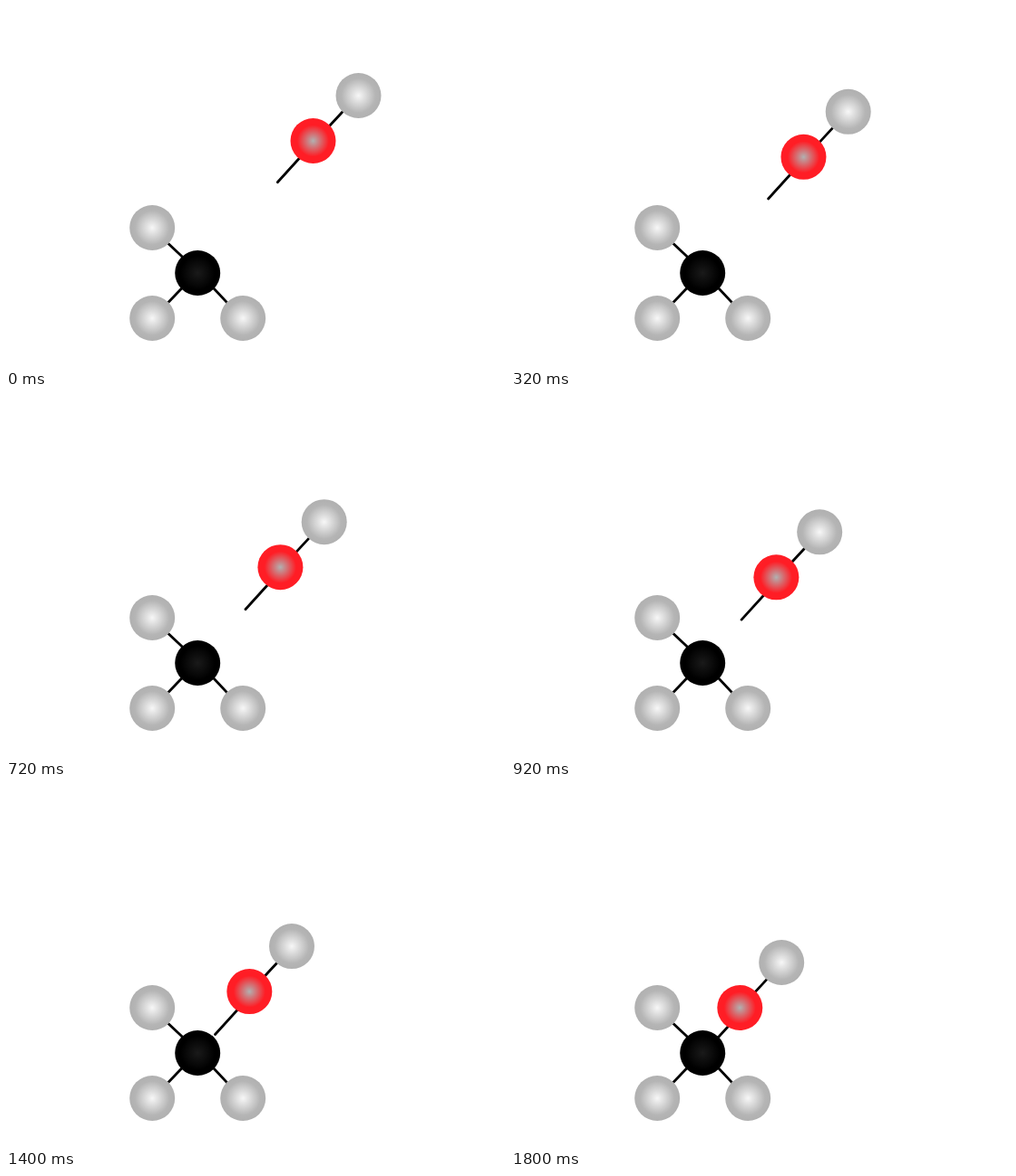
Write an HTML page that moves like this. It is 550 by 400 pixels and loops after 2160 ms.

```html
<!DOCTYPE html>
<html lang="en">
<head>
<meta charset="utf-8">
<title>Bond formation</title>
<style>
  html, body { margin: 0; width: 100%; height: 100%; overflow: hidden; background: #fff; }
  svg { display: block; width: 100vw; height: 100vh; }
  line { stroke: #000; stroke-width: 2.8; stroke-linecap: round; }
</style>
</head>
<body>
<svg viewBox="0 0 550 400">
  <defs>
    <radialGradient id="hydrogen">
      <stop offset="0" stop-color="#f7f7f7"/>
      <stop offset=".75" stop-color="#b5b5b5"/>
      <stop offset="1" stop-color="#b0b0b0"/>
    </radialGradient>
    <radialGradient id="oxygen">
      <stop offset="0" stop-color="#b1b1b1"/>
      <stop offset=".7" stop-color="#ff1d25"/>
    </radialGradient>
    <radialGradient id="carbon">
      <stop offset="0" stop-color="#1a1a1a"/>
      <stop offset=".75" stop-color="#000"/>
    </radialGradient>
  </defs>
  <g id="bonds"></g>
  <g id="atoms"></g>
</svg>
<script>
const LOOP = 2160, STEP = 40, LAST_STEP = 43;

function add(parent, tag, attrs) {
  const node = document.createElementNS('http://www.w3.org/2000/svg', tag);
  for (const key in attrs) node.setAttribute(key, attrs[key]);
  document.getElementById(parent).append(node);
  return node;
}
const bond = (x1, y1, x2, y2) => add('bonds', 'line', { x1, y1, x2, y2 });
const atom = (kind, cx, cy) => add('atoms', 'circle', { cx, cy, r: 25, fill: `url(#${kind})` });

bond(165, 249.4, 208, 290);
bond(165, 342, 208, 297);
bond(215, 297, 257, 342);
atom('hydrogen', 161.2, 245);
atom('hydrogen', 161.2, 345);
atom('hydrogen', 261.2, 345);
atom('carbon', 211.2, 295);

// Each moving part drifts by (dx, dy) per step.
const movers = [
  { node: bond(299.3, 194.7, 338, 152), dx: -1.965, dy: 2.28 },
  { node: bond(345, 145, 387, 99.5), dx: -2.05, dy: 2.23 },
  { node: atom('oxygen', 338.5, 149), dx: -2.005, dy: 2.232 },
  { node: atom('hydrogen', 388.5, 99), dx: -2.1, dy: 2.232 }
];

function draw(time) {
  const step = Math.min(LAST_STEP, Math.floor(time % LOOP / STEP));
  for (const { node, dx, dy } of movers)
    node.setAttribute('transform', `translate(${dx * step} ${dy * step})`);
}

const start = performance.now();
function tick() {
  draw(performance.now() - start);
  requestAnimationFrame(tick);
}
tick();
</script>
</body>
</html>
```
